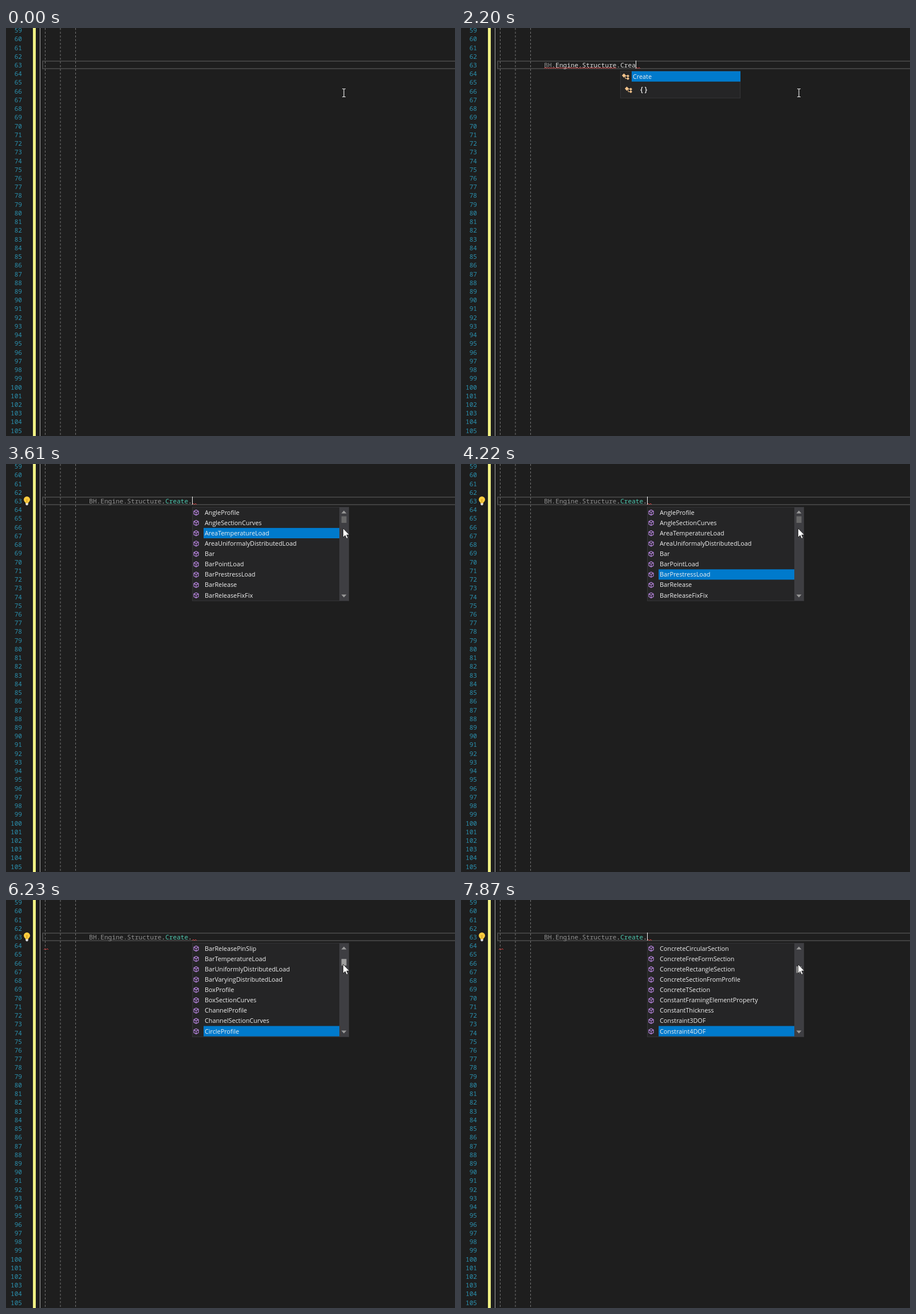
An HTML page for the animation above (8000 ms loop, 784x714 px).

```html
<!DOCTYPE html>
<html lang="en">
<head>
<meta charset="utf-8">
<title>Code completion</title>
<style>
  html, body { margin: 0; width: 100%; height: 100%; overflow: hidden; background: #1e1e1e; }
  svg { display: block; width: 784px; height: 714px; }
  .mono { font: 11.1px "Noto Sans Mono", "DejaVu Sans Mono", monospace; fill: #dcdcdc; white-space: pre; }
  .num { fill: #2b91af; text-anchor: end; }
  .list text { font: 10.8px "Open Sans", "Noto Sans", sans-serif; fill: #f1f1f1; }
  .guide { stroke: #747474; stroke-dasharray: 3.5 3; }
  .squiggle { fill: none; stroke: #d13c3c; stroke-width: 1; }
</style>
</head>
<body>
<svg id="stage" viewBox="0 0 784 714">
  <defs>
    <g id="cube" fill="none" stroke="#b180d7" stroke-width="1.2" stroke-linejoin="round">
      <path d="M0-4.6 4-2.5V2.4L0 4.6-4 2.4V-2.5Z M-4-2.5 0-.3 4-2.5 M0-.3V4.6"/>
    </g>
    <g id="classIcon" fill="#f3c38b">
      <path d="M-3.5-5.5 0-2-3.5 2-7-2Z M3.5-3.5 6-1 3.5 1.5 1-1Z M3.5 1 6 3.5 3.5 6 1 3.5Z"/>
      <path d="M-2-1.5H3 M-1-1V3.5H3" fill="none" stroke="#f3c38b"/>
    </g>
  </defs>
  <rect width="784" height="714" fill="#1e1e1e"/>
  <g id="numbers"></g>
  <rect x="47" width="5" height="714" fill="#f0f083"/>
  <path d="M59.5 0V714" stroke="#a5a5a5"/>
  <rect x="64" y="58" width="740" height="13.2" fill="none" stroke="#484848" stroke-width="1.7"/>
  <path class="guide" d="M68.5 0V714M95 0V714M121.5 0V714"/>

  <g id="bulb">
    <circle cx="36.5" cy="62.3" r="5.5" fill="#ffcc3d"/>
    <path d="M34 65H39V69H34Z" fill="#ffcc3d"/>
    <path d="M34.3 68.5H38.7V71L37.5 72.2H35.5L34.3 71Z" fill="#dedede"/>
    <path d="M35 61.5 36.5 63 38 61.5M36.5 63V68" fill="none" stroke="#a87a16" stroke-width=".7"/>
  </g>

  <text id="code" class="mono" x="145" y="69" xml:space="preserve"></text>
  <path id="nameError" class="squiggle"/>
  <path id="endError" class="squiggle"/>
  <path id="nextError" class="squiggle"/>
  <rect id="caret" y="57" width="1" height="14" fill="#f4f4f4"/>

  <g id="classes" class="list"></g>
  <g id="methods" class="list"></g>

  <g id="ibeam" fill="none" stroke="#e6e6e6" stroke-width="1.2">
    <path d="M587 106.5H589.2L590 107.2 590.8 106.5H593M590 107V120M587 120.5H589.2L590 119.8 590.8 120.5H593"/>
  </g>
  <path id="arrow" d="M588.5 112.5V128.5L592.2 125 594.7 130.6 597.2 129.5 594.8 124.1H599.6Z"
        fill="#fff" stroke="#111" stroke-width=".8"/>
</svg>
<script>
const LOOP = 8000, LINE = 15.23, ROW = 18.1, CHAR = 6.66, TEXT_X = 145;
const $ = id => document.getElementById(id);
const show = (id, on) => $(id).setAttribute('visibility', on ? 'visible' : 'hidden');

// Each table lists [start time, value].
const TYPED = [[0, ''], [900, 'BH.Engine.Structure'], [1810, 'BH.Engine.Structure.'],
  [1960, 'BH.Engine.Structure.C'], [2040, 'BH.Engine.Structure.Cr'],
  [2120, 'BH.Engine.Structure.Cre'], [2200, 'BH.Engine.Structure.Crea'],
  [2290, 'BH.Engine.Structure.Creat'], [2360, 'BH.Engine.Structure.Create'],
  [2440, 'BH.Engine.Structure.Create.']];
const CARET = [[0, 0], [360, 1], [1440, 0], [1810, 1], [2600, 0], [3180, 1], [3700, 0], [4220, 1],
  [4795, 0], [5270, 1], [5840, 0], [6370, 1], [6910, 0], [7390, 1]];
const BULB = [[0, 0], [1440, 1], [1810, 0], [3250, 1]];
const POPUP = [[0, ''], [1890, 'all'], [1960, 'c'], [2040, 'create'], [2440, ''], [2520, 'methods']];
const SELECTED = [0, 3350, 3470, 3590, 3800, 3920, 4020, 4130, 4450, 4565, 4910, 5030, 5190, 5380,
  5490, 5580, 5710, 5970, 6100, 6230, 6370, 6480, 6590, 6750, 6910, 7070, 7230, 7390, 7550, 7710, 7870]
  .map((time, i) => [time, i - 1]);

const CLASSES = {
  all: ['Compute', 'Convert', 'Create', 'Modify', 'Objects', 'Query', 'Reflection', 'Results'],
  c: ['Compute', 'Convert', 'Create'],
  create: ['Create']
};
const METHODS = `AngleProfile AngleSectionCurves AreaTemperatureLoad AreaUniformalyDistributedLoad
  Bar BarPointLoad BarPrestressLoad BarRelease BarReleaseFixFix BarReleasePinPin BarReleasePinSlip
  BarTemperatureLoad BarUniformlyDistributedLoad BarVaryingDistributedLoad BoxProfile BoxSectionCurves
  ChannelProfile ChannelSectionCurves CircleProfile CircleSectionCurves ConcreteBoxSection
  ConcreteCircularSection ConcreteFreeFormSection ConcreteRectangleSection ConcreteSectionFromProfile
  ConcreteTSection ConstantFramingElementProperty ConstantThickness Constraint3DOF Constraint4DOF`
  .split(/\s+/);

function at(table, t) {
  let value = table[0][1];
  for (const [time, v] of table) if (t >= time) value = v;
  return value;
}

function squiggle(x, y, width) {
  let d = `M${x} ${y}`;
  for (let i = 1; i * 2 <= width; i++) d += `L${x + i * 2} ${y - (i % 2 ? 2 : 0)}`;
  return d;
}

const rect = (x, y, w, h, style) => `<rect x="${x}" y="${y}" width="${w}" height="${h}" ${style}/>`;
const frame = (x, w, h) => rect(x + .5, 75.5, w - 1, h - 1, 'fill="#252526" stroke="#343437"');

function rows(items, x, width, icon, selected, soft) {
  return items.map((name, i) => {
    const y = 75.7 + i * ROW;
    let mark = '';
    if (i === selected) mark = soft
      ? rect(x + .5, y + .5, width - 1, ROW - 1.2, 'fill="none" stroke="#007acc"')
      : rect(x, y, width, ROW, 'fill="#007acc"');
    return `${mark}<use href="#${icon}" x="${x - (icon === 'cube' ? 13 : 10)}" y="${y + 9.3}"/>` +
      `<text x="${x + 2}" y="${y + 13}">${name}</text>`;
  }).join('');
}

function classList(kind) {
  const items = CLASSES[kind], barY = 76 + items.length * ROW;
  return frame(278, 210, items.length * ROW + 30) +
    rows(items, 298, 190, 'classIcon', 0, kind === 'all') +
    `<use href="#classIcon" x="293" y="${barY + 14}"/>` +
    `<text x="313" y="${barY + 18}" style="font-weight:600;font-size:12px">{ }</text>`;
}

function methodList(selected) {
  const soft = selected < 0, index = Math.max(0, selected), top = Math.max(0, index - 8);
  const thumbY = 91.5 + top * 1.17, hover = top > 8;
  return frame(325, 274, 165) +
    rect(582, 76, 16.5, 163, 'fill="#3e3e42"') +
    '<path d="M585.5 86.5 590 81.5 594.5 86.5ZM585.5 228.5 590 233.5 594.5 228.5Z" fill="#999"/>' +
    rect(585.7, thumbY, 8.8, 11.5, `fill="${hover ? '#9e9e9e' : '#686868'}"`) +
    rows(METHODS.slice(top, top + 9), 345, 237, 'cube', index - top, soft);
}

function colouredCode(text, t) {
  const dim = t >= 3250 ? 19 : t >= 980 ? 2 : 0;
  const span = (from, to, fill) => `<tspan fill="${fill}">${text.slice(from, to)}</tspan>`;
  return span(0, dim, '#929292') + span(dim, 20, '#dcdcdc') +
    span(20, 26, t >= 2860 ? '#4ec9b0' : '#dcdcdc') + span(26, 27, '#dcdcdc');
}

let lastCode, lastList;
function render(t) {
  const text = at(TYPED, t), end = TEXT_X + text.length * CHAR, popup = at(POPUP, t);
  const code = colouredCode(text, t);
  if (code !== lastCode) $('code').innerHTML = lastCode = code;

  const methodsOpen = popup === 'methods';
  const list = !popup ? '' : methodsOpen ? methodList(at(SELECTED, t)) : classList(popup);
  if (list !== lastList) {
    $('classes').innerHTML = methodsOpen ? '' : list;
    $('methods').innerHTML = methodsOpen ? list : '';
    lastList = list;
  }

  $('caret').setAttribute('x', Math.round(end));
  $('endError').setAttribute('d', squiggle(Math.round(end), 71, 8));
  show('caret', at(CARET, t));
  show('bulb', at(BULB, t));
  show('nameError', t >= 980 && t < 2520);
  show('endError', t >= 1810);
  show('nextError', t >= 4680);
  show('ibeam', !methodsOpen);
  show('arrow', methodsOpen);
}

for (let n = 59; n <= 105; n++)
  $('numbers').innerHTML += `<text class="mono num" x="28" y="${69 + (n - 63) * LINE}">${n}</text>`;
$('nameError').setAttribute('d', squiggle(TEXT_X, 71, 126));
$('nextError').setAttribute('d', squiggle(66, 87, 8));

const start = performance.now();
function tick() {
  render((performance.now() - start) % LOOP);
  requestAnimationFrame(tick);
}
tick();
</script>
</body>
</html>
```
